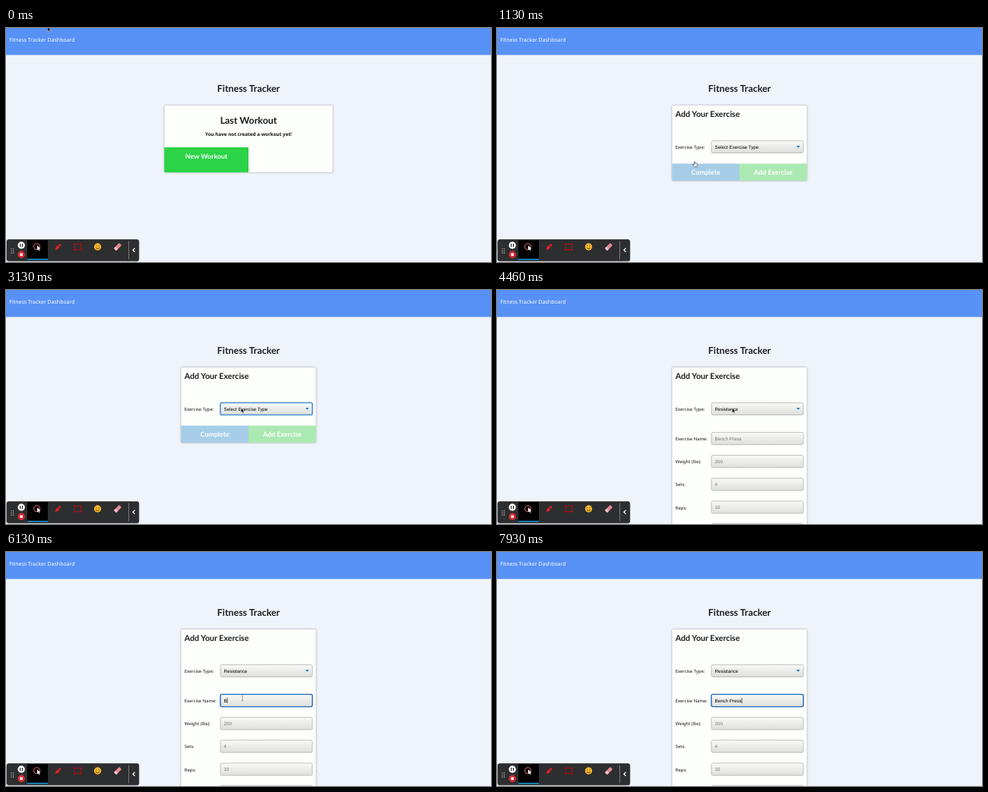
An HTML page that plays this animation: 638 px wide and 308 px high, repeating every 8 s.

```html
<!DOCTYPE html>
<html lang="en">
<head>
<meta charset="utf-8">
<title>Fitness Tracker</title>
<style>
  html, body { margin: 0; width: 100%; height: 100%; overflow: hidden; background: #eff4fa; }
  svg { display: block; width: 100%; height: 100%; text-rendering: geometricPrecision; }
  .head { font: bold 12.4px Lato, sans-serif; text-anchor: middle; fill: #1b1c1d; }
  .sub { font: bold 10.64px Lato, sans-serif; fill: #1b1c1d; }
  .button { font: bold 8.9px Lato, sans-serif; text-anchor: middle; fill: #fff; }
  .label { font: 5.88px "Noto Sans", sans-serif; fill: #111; }
  .note { font: bold 6.3px "Noto Sans", sans-serif; text-anchor: middle; fill: #111; }
  .value { font: 6.2px "Liberation Sans", Arial, sans-serif; fill: #000; }
  .hint { fill: #757575; }
  .tool { font: bold 4.2px "Liberation Sans", Arial, sans-serif; text-anchor: middle; fill: #fff; }
  .card { fill: #fdfffc; stroke: #cfd3d6; stroke-width: .5; filter: drop-shadow(0 .8px 1px #0004); }
  .box { fill: url(#field); stroke: #a9a9a9; stroke-width: .7; }
</style>
</head>
<body>
<svg viewBox="0 0 638 308">
  <defs>
    <linearGradient id="field" x2="0" y2="1">
      <stop stop-color="#f9faf8"/><stop offset="1" stop-color="#dededd"/>
    </linearGradient>
  </defs>
  <rect width="638" height="308" fill="#eff4fa"/>
  <rect width="638" height="35.5" fill="#5891f5"/>
  <text x="4.3" y="18.4" font-family="Noto Sans, sans-serif" font-size="6.95" fill="#fff">Fitness Tracker Dashboard</text>
  <text class="head" x="319" y="83.5">Fitness Tracker</text>

  <g id="home">
    <rect class="card" x="208.2" y="101.8" width="221.6" height="88.2" rx="1.5"/>
    <text class="head" x="319" y="125.8">Last Workout</text>
    <text class="note" x="319" y="141.9">You have not created a workout yet!</text>
    <path id="newButton" d="M208.2 157H319V190H209.7a1.5 1.5 0 0 1-1.5-1.5z"/>
    <text class="button" x="263.6" y="171.9">New Workout</text>
  </g>

  <g id="form">
    <rect id="formCard" class="card" x="230.2" y="101.8" width="177.6" height="99.2" rx="1.5"/>
    <text class="sub" x="234.8" y="116.8">Add Your Exercise</text>
    <text class="label" x="234.8" y="158.9">Exercise Type:</text>
    <rect class="box" id="select" x="282" y="148.4" width="121" height="16" rx="2"/>
    <text class="value" id="choice" x="286.6" y="158.6"></text>
    <path d="M393.8 155h4.8l-2.4 2.7z" fill="#1b7fc4"/>
    <g id="actions">
      <path d="M230.2 178.4H319V201H231.7a1.5 1.5 0 0 1-1.5-1.5z" fill="#a6cde8"/>
      <path d="M319 178.4H407.8V199.5a1.5 1.5 0 0 1-1.5 1.5H319z" fill="#abe9b2"/>
      <text class="button" x="274.6" y="193.2">Complete</text>
      <text class="button" x="363.4" y="193.2">Add Exercise</text>
    </g>
    <g id="details"></g>
  </g>

  <g id="toolbar">
    <rect x="1" y="278.6" width="173.8" height="28.2" rx="2.5" fill="#2d2e2f" stroke="#1d1e1f" stroke-width=".6"/>
    <path d="M7 290v7M9.6 290v7" stroke="#bbb" stroke-width="1.1" stroke-dasharray="1.1 .85"/>
    <circle cx="20.2" cy="286" r="4.7" fill="#fff"/>
    <path d="M18.8 284v4M21.6 284v4" stroke="#222" stroke-width="1.2"/>
    <circle cx="20.2" cy="298.2" r="4.7" fill="#d92b35"/>
    <rect x="18.5" y="296.5" width="3.4" height="3.4" rx=".4" fill="#fff"/>
    <rect x="28" y="279" width="27" height="26.5" fill="#000"/>
    <rect x="28" y="303.8" width="27" height="1.5" fill="#1c9fe8"/>
    <circle cx="40.6" cy="287.7" r="4" fill="none" stroke="#d5606a" stroke-width="1.1"/>
    <path d="M41 286.2v6.2l1.5-1.4 1.1 2.2 1-.5-1-2.2h2z" fill="#fff"/>
    <path d="M64.8 292l.9-3.8 2.4-2.1 2.3 2.3-2 2.5zM68.7 285.5l1.7-1.8 2.3 2.3-1.7 1.8z" fill="#e0202c"/>
    <rect x="90.2" y="284.4" width="8.6" height="7.4" fill="none" stroke="#a90f1b" stroke-width="1"/>
    <path d="M89.2 284.4h2M97.8 284.4h2M89.2 291.8h2M97.8 291.8h2" stroke="#a90f1b" stroke-width="2"/>
    <circle cx="120.5" cy="288" r="4.7" fill="#f6b92f"/>
    <path d="M118.1 286.7h1.2M121.7 286.7h1.2M118 289.3q2.5 2.8 5 0" fill="none" stroke="#6b3b08" stroke-width="1"/>
    <g transform="rotate(-45 147 288)">
      <rect x="142" y="285.8" width="10" height="4.4" rx="1" fill="#e58a96"/>
      <rect x="142" y="285.8" width="3.2" height="4.4" rx="1" fill="#f3c3c8"/>
    </g>
    <path d="M161.5 280.5v24" stroke="#aaa" stroke-width=".6"/>
    <path d="M169.5 289.8l-2.6 2.5 2.6 2.5" fill="none" stroke="#fff" stroke-width="1.2"/>
  </g>

  <circle id="ring" fill="none" stroke="#d3242b"/>
  <g id="pointer">
    <path id="arrow" d="M0 0v6.3l1.5-1.4 1.1 2.4 1-.4-1-2.4h2z" fill="#111" stroke="#fff" stroke-width=".4"/>
    <path id="hand" d="M-.6 .7q.7-.9 1.4 0v2.2l2 .5q.8.3.7 1.2l-.5 2.8h-3.4l-2.3-2.7q0-1 1.1-.6l1 .7z" fill="#fff" stroke="#222" stroke-width=".6"/>
    <path id="beam" d="M-1.2-3.3q1.2 0 1.2.7 0-.7 1.2-.7M0-2.6v5.2M-1.2 3.3q1.2 0 1.2-.7 0 .7 1.2.7" fill="none" stroke="#555" stroke-width=".55"/>
  </g>
</svg>
<script>
const LOOP = 8000, PAGE = 1130, SELECT = 3060, CHOSEN = 4460, FOCUS = 5330;
const CLICKS = [640, FOCUS];
const MOVES = [ // start, end, x, y
  [0, 0, 54.6, -1.6],
  [30, 460, 260, 175.4],
  [2230, 2730, 309.3, 155.3],
  [5000, 5290, 311, 192.4],
];
const NAME = 'Bench Press';
const KEYS = [6130, 6260, 6400, 6530, 6660, 7060, 7260, 7400, 7530, 7660, 7860];
const FIELDS = [
  ['Exercise Name:', NAME, 187.4], ['Weight (lbs):', '200', 217.6],
  ['Sets:', '4', 247.7], ['Reps:', '10', 277.9], ['', '', 307.2],
];

const el = id => document.getElementById(id);
const show = (id, on) => el(id).style.display = on ? '' : 'none';
const set = (id, attrs) => { for (const k in attrs) el(id).setAttribute(k, attrs[k]); };

el('details').innerHTML = FIELDS.map(([label, hint, y], i) => `
  <text class="label" x="234.8" y="${y + 10.6}">${label}</text>
  <rect class="box" id="box${i}" x="282" y="${y}" width="121" height="16.2" rx="2"/>
  <text class="value hint" id="value${i}" x="286.6" y="${y + 10.3}">${hint}</text>`).join('') +
  '<rect id="caret" y="192" width=".7" height="7" fill="#111"/>';

function pointerAt(t) {
  let [, , x, y] = MOVES[0];
  for (const [start, end, toX, toY] of MOVES.slice(1)) {
    const p = Math.min(1, Math.max(0, (t - start) / (end - start)));
    const e = p * p * (3 - 2 * p);
    x += (toX - x) * e;
    y += (toY - y) * e;
  }
  return [x, y];
}

function drawPointer(t, [x, y]) {
  const hand = t < PAGE ? x > 208 && y > 157 : t < 2300;
  const beam = t >= CHOSEN && y > 187;
  set('pointer', { transform: `translate(${x} ${y})` });
  show('arrow', !hand && !beam);
  show('hand', hand);
  show('beam', beam && t < KEYS[5]);
  set('newButton', { fill: hand ? '#1fa134' : '#2bd346' });
}

function drawRing(t, [x, y]) {
  const age = t - CLICKS.findLast(c => c <= t);
  const visible = age >= 0 && age < 420;
  show('ring', visible);
  if (!visible) return;
  const grow = Math.min(1, (age + 10) / 170);
  set('ring', {
    cx: x, cy: y + (t < PAGE ? 1 : 0), r: 1 + 13.5 * grow * (2 - grow) * (grow < 1 ? .5 + .5 * grow : 1),
    'stroke-width': .6 + .9 * grow,
    opacity: Math.min(.55 + .4 * grow, (420 - age) / 200),
  });
}

function drawName(t) {
  const typed = KEYS.filter(k => k <= t).length;
  const focused = t >= FOCUS;
  const value = el('value0');
  value.textContent = typed ? NAME.slice(0, typed) : NAME;
  value.classList.toggle('hint', !typed);
  el('box0').style.cssText = focused ? 'stroke:#1d66b3;stroke-width:1.4' : '';
  const lastInput = typed ? KEYS[typed - 1] : FOCUS;
  show('caret', focused && (t - lastInput) % 1000 < 500);
  if (t >= CHOSEN) set('caret', { x: 286.6 + (typed ? value.getComputedTextLength() : 0) });
}

function draw(t) {
  const chosen = t >= CHOSEN;
  const position = pointerAt(t);
  show('home', t < PAGE);
  show('form', t >= PAGE);
  show('actions', !chosen);
  show('details', chosen);
  set('formCard', { height: chosen ? 260 : 99.2 });
  el('choice').textContent = chosen ? 'Resistance' : 'Select Exercise Type';
  el('select').style.cssText = t >= SELECT && t < FOCUS && !chosen ? 'stroke:#5c9bd6;stroke-width:1.8' : '';
  drawName(t);
  drawRing(t, position);
  drawPointer(t, position);
}

const begin = performance.now();
function frame() {
  draw((performance.now() - begin) % LOOP);
  requestAnimationFrame(frame);
}
frame();
</script>
</body>
</html>
```
